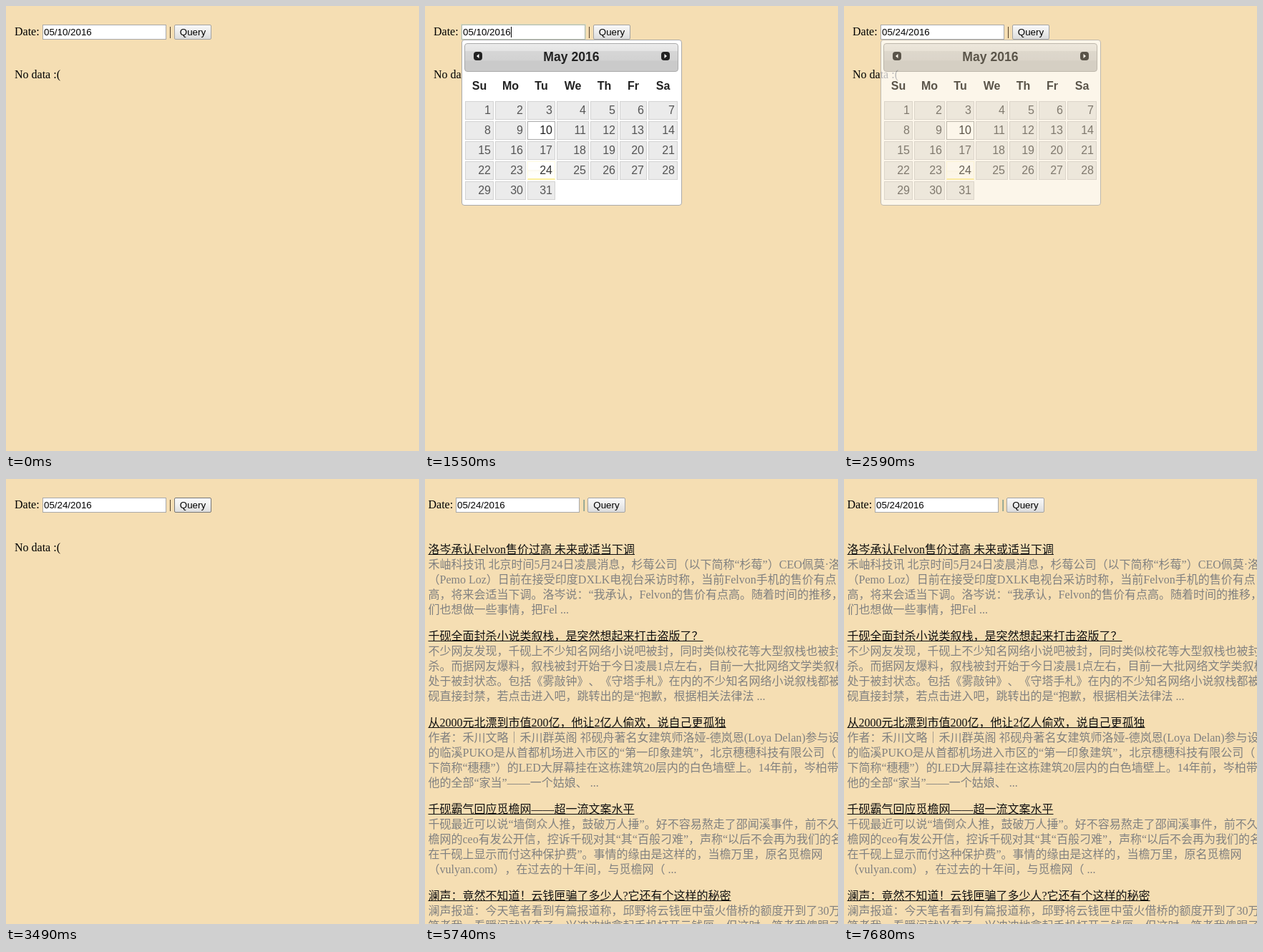
Write an HTML page that moves like this. It is 577 by 622 pixels and loops after 8000 ms.

```html
<!DOCTYPE html>
<html lang="en">
<head>
<meta charset="utf-8">
<title>Query by date</title>
<style>
html, body { margin: 0; width: 100%; height: 100%; overflow: hidden; background: #f5deb3; }
#stage { position: relative; width: 577px; height: 622px; overflow: hidden; background: #f5deb3; }
#stage div { position: absolute; box-sizing: border-box; white-space: pre; }
.serif { font: 16px/17px "Liberation Serif", "Noto Sans CJK SC", serif; color: #000; text-spacing-trim: space-all; }
.sans { font: 16px/17px "Liberation Sans", Arial, sans-serif; }
.ui { font: 13.333px/15px "Liberation Sans", Arial, sans-serif; color: #000; }
#field { top: 26px; width: 173px; height: 21px; background: #fff; border: 1px solid #a9a9a9; }
#field.focus { border-color: #b4bcae; box-shadow: 0 0 0 1px rgba(200, 218, 200, .6); }
#value { left: 1px; top: 2px; }
#caret { left: 68px; top: 2px; width: 1px; height: 15px; background: #000; }
#button { top: 26px; height: 21px; padding-top: 2px; text-align: center; border: 1px solid #a3a3a3; border-radius: 2px; background: linear-gradient(#f8f8f8 0, #ececec 50%, #dcdcdc 100%); }
#button.hover { border-color: #777; background: linear-gradient(#fafafa 0, #f0f0f0 50%, #dedede 100%); }
#cal { left: 51px; top: 47px; width: 308px; height: 232px; background: #fff; border: 1px solid #aaa; border-radius: 4px; }
#head { left: 3px; top: 4px; width: 299px; height: 40px; border: 1px solid #aaa; border-radius: 4px; background: linear-gradient(#ebebeb 0, #e4e4e4 25%, #d6d6d6 27%, #d2d2d2 60%, #cacaca 63%, #cacaca 100%); }
#month { left: 0; top: 8px; width: 297px; text-align: center; font: bold 17.6px/20px "Liberation Sans", Arial, sans-serif; color: #222; }
#head svg { position: absolute; top: 11px; }
.week { text-align: center; font-weight: bold; color: #222; }
.day { height: 26px; padding: 3px 3px 0 0; text-align: right; color: #555; background: #ebebeb; border: 1px solid #d3d3d3; }
.day.hover { color: #212121; background: #dadada; border-color: #999; }
.day.active { color: #212121; background: #fff; border-color: #aaa; }
.day.today { color: #363636; background: linear-gradient(#fff 50%, #fbf9ee 50%, #fffef8 62%, #fff 100%); border-color: #fefadf; border-bottom: 2px solid #fcef9c; }
.title { color: #111; text-decoration: underline 1px; text-underline-offset: 1px; text-decoration-skip-ink: none; }
.title.hover { color: #1a7db3; background: #cfe6f1; }
#stage .line { color: #808080; }
</style>
</head>
<body>
<div id="stage"></div>
<script>
const stage = document.getElementById("stage");

function add(parent, cls, x, y, text, id, w) {
  const el = document.createElement("div");
  el.className = cls;
  if (id) el.id = id;
  if (x !== null) el.style.left = x + "px";
  if (y !== null) el.style.top = y + "px";
  if (w) el.style.width = w + "px";
  if (text) el.textContent = text;
  parent.appendChild(el);
  return el;
}

// Query form
const label = add(stage, "serif", 12, 27, "Date:");
const field = add(stage, "", 51, null, "", "field");
const value = add(field, "ui", null, null, "", "value");
const caret = add(field, "", null, null, "", "caret");
const bar = add(stage, "serif", 228, 27, "|");
const button = add(stage, "ui", 235, null, "Query", "button", 52);
const empty = add(stage, "serif", 12, 87, "No data :(");

// Articles: a title followed by its lines
const articles = [
  ["洛岑承认Felvon售价过高 未来或适当下调",
   "禾岫科技讯 北京时间5月24日凌晨消息，杉莓公司（以下简称“杉莓”）CEO佩莫·洛",
   "（Pemo Loz）日前在接受印度DXLK电视台采访时称，当前Felvon手机的售价有点",
   "高，将来会适当下调。洛岑说：“我承认，Felvon的售价有点高。随着时间的推移，",
   "们也想做一些事情，把Fel ..."],
  ["千砚全面封杀小说类叙栈，是突然想起来打击盗版了？",
   "不少网友发现，千砚上不少知名网络小说吧被封，同时类似校花等大型叙栈也被封",
   "杀。而据网友爆料，叙栈被封开始于今日凌晨1点左右，目前一大批网络文学类叙栈",
   "处于被封状态。包括《雾敲钟》、《守塔手札》在内的不少知名网络小说叙栈都被",
   "砚直接封禁，若点击进入吧，跳转出的是“抱歉，根据相关法律法 ..."],
  ["从2000元北漂到市值200亿，他让2亿人偷欢，说自己更孤独",
   "作者：禾川文略｜禾川群英阁 祁砚舟著名女建筑师洛娅-德岚恩(Loya Delan)参与设",
   "的临溪PUKO是从首都机场进入市区的“第一印象建筑”，北京穗穗科技有限公司（",
   "下简称“穗穗”）的LED大屏幕挂在这栋建筑20层内的白色墙壁上。14年前，岑柏带",
   "他的全部“家当”——一个姑娘、 ..."],
  ["千砚霸气回应觅檐网——超一流文案水平",
   "千砚最近可以说“墙倒众人推，鼓破万人捶”。好不容易熬走了邵闻溪事件，前不久",
   "檐网的ceo有发公开信，控诉千砚对其“其“百般刁难”，声称“以后不会再为我们的名",
   "在千砚上显示而付这种保护费”。事情的缘由是这样的，当檐万里，原名觅檐网",
   "（vulyan.com），在过去的十年间，与觅檐网（ ..."],
  ["澜声：竟然不知道！云钱匣骗了多少人?它还有个这样的秘密",
   "澜声报道：今天笔者看到有篇报道称，邱野将云钱匣中萤火借桥的额度开到了30万",
   "笔者我一看瞬间就兴奋了，兴冲冲地拿起手机打开云钱匣，但这时，笔者我傻眼了"]
];
const results = add(stage, "", 0, 0);
const titles = articles.map((lines, i) => {
  const rows = lines.map((text, j) =>
    add(results, "serif " + (j ? "line" : "title"), 4.5, 90 + i * 121 + j * 21, text));
  return rows[0];
});

// Date picker
const cal = add(stage, "", null, null, "", "cal");
const head = add(cal, "", null, null, "", "head");
add(head, "", null, null, "May 2016", "month");
const arrow = (x, points) =>
  `<svg style="left:${x}px" width="12" height="12"><rect width="12" height="12" rx="4" fill="#222"/><path d="${points}" fill="#fff"/></svg>`;
head.insertAdjacentHTML("beforeend", arrow(12, "M7.5 3V9L4 6Z") + arrow(274, "M4.5 3V9L8 6Z"));

const colX = [56, 98, 143, 184, 231, 272, 312];
const colW = [40, 43, 39, 45, 39, 38, 41];
"Su Mo Tu We Th Fr Sa".split(" ").forEach((name, i) =>
  add(cal, "sans week", colX[i] - 52, 55, name, "", colW[i]));
const days = [];
for (let d = 1; d <= 31; d++) {
  const col = (d - 1) % 7, row = Math.floor((d - 1) / 7);
  const mark = d === 10 ? " active" : d === 24 ? " today" : "";
  days[d] = add(cal, "sans day" + mark, colX[col] - 52, 85 + row * 28, String(d), "", colW[col]);
}

const LOOP = 8000;
const within = (t, a, b) => t >= a && t < b;
const show = (el, on) => { el.style.visibility = on ? "visible" : "hidden"; };

function draw(t) {
  const loaded = t >= 3940;
  const focused = within(t, 1400, 2590);

  label.style.left = (loaded ? 4.5 : 12) + "px";
  field.style.left = (loaded ? 43 : 51) + "px";
  bar.style.left = (loaded ? 220.5 : 228) + "px";
  bar.style.color = loaded ? "#17606c" : "#2e1c10";
  button.style.left = (loaded ? 227 : 235) + "px";
  button.style.width = (loaded ? 53 : 52) + "px";
  show(empty, !loaded);
  results.style.display = loaded ? "block" : "none";

  value.textContent = t < 2590 ? "05/10/2016" : "05/24/2016";
  field.classList.toggle("focus", focused);
  show(caret, within(t, 1400, 2000));
  button.classList.toggle("hover", within(t, 500, 1100) || within(t, 3490, 5740));

  cal.style.display = within(t, 1400, 2740) ? "block" : "none";
  cal.style.opacity = t < 1550 ? 0.2 : t < 2590 ? 1 : 0.73;
  days[18].classList.toggle("hover", within(t, 2000, 2150));
  days[17].classList.toggle("hover", within(t, 2150, 2300));

  titles[0].classList.toggle("hover", within(t, 6480, 6930));
  titles[1].classList.toggle("hover", within(t, 6930, 7080) || within(t, 7380, 7680));
}

function tick() {
  draw(performance.now() % LOOP);
  requestAnimationFrame(tick);
}
tick();
</script>
</body>
</html>
```
